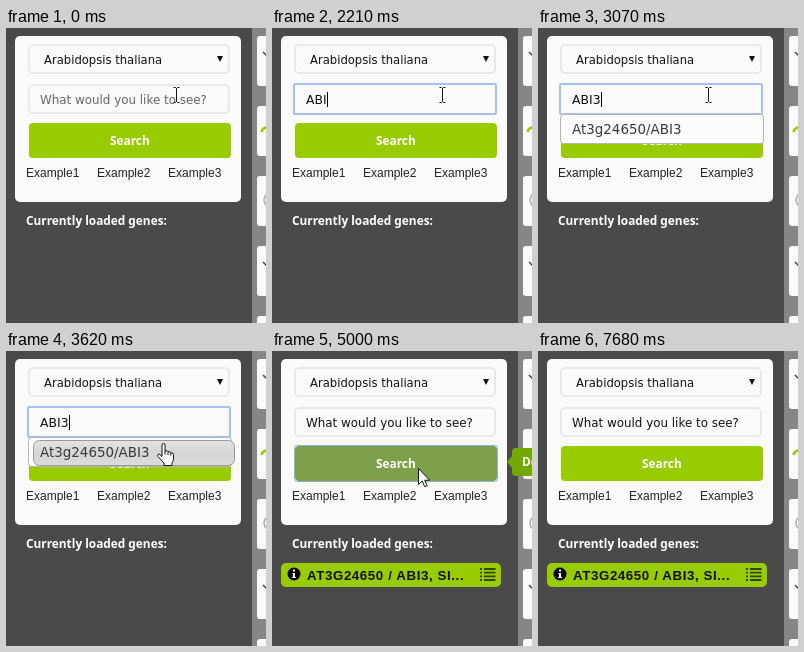
An HTML page for the animation above (7.78 s loop, 260 px wide and 295 px high).

```html
<!DOCTYPE html>
<html lang="en">
<head>
<meta charset="utf-8">
<title>Gene search</title>
<style>
html, body { margin: 0; width: 100%; height: 100%; overflow: hidden; background: #4a4a4a; }
svg { display: block; width: 260px; height: 295px; }
text { white-space: pre; font-family: "DejaVu Sans", sans-serif; fill: #111; }
.bold { font: bold 11.85px "Noto Sans", sans-serif; fill: #fff; }
.link { font: 12px "Liberation Sans", sans-serif; fill: #222; }
.item { font-size: 13.45px; fill: #3a3a3a; }
.gene { font: bold 13.3px "Liberation Sans", sans-serif; letter-spacing: .6px; }
</style>
</head>
<body>
<svg viewBox="0 0 260 295">
  <defs>
    <linearGradient id="shade" x2="0" y2="1">
      <stop stop-color="#e4e4e4"/><stop offset=".5" stop-color="#d4d4d4"/><stop offset="1" stop-color="#dcdcdc"/>
    </linearGradient>
  </defs>
  <rect width="260" height="295" fill="#4a4a4a"/>
  <rect x="246" width="14" height="295" fill="#868686"/>
  <g id="cards" fill="#fafafa"></g>
  <g fill="none" stroke="#444" stroke-width="1.5">
    <path d="M257 24l4 4M257 234l4 4"/>
    <path d="M255.500 104q1-4 5-4.500" stroke="#9c0" stroke-width="2.500"/>
    <circle cx="265" cy="172" r="7" stroke="#aaa"/>
  </g>

  <rect x="9" y="8" width="226" height="166" rx="5" fill="#fafafa"/>
  <rect x="23" y="17" width="200" height="28" rx="4" fill="#fafafa" stroke="#e9e9e9" stroke-width="2"/>
  <text x="38" y="36" font-size="11.6">Arabidopsis thaliana</text>
  <path d="M211 28h6l-3 6z" fill="#111"/>

  <rect id="field" x="23" y="57" width="200" height="28" rx="4" fill="#fafafa" stroke="#e9e9e9" stroke-width="2"/>
  <rect id="focus" x="22" y="56" width="202" height="30" rx="1" fill="#fafafa" stroke="#a3c1f3" stroke-width="2"/>
  <text id="entry" x="34" y="76"></text>
  <rect id="caret" y="64" width="1" height="15"/>

  <rect id="button" x="23" y="95" width="202" height="35" rx="4"/>
  <rect id="ring" x="22.500" y="94.500" width="203" height="36" rx="2" fill="none" stroke="#8fb3d8"/>
  <text class="bold" x="104" y="117">Search</text>
  <text class="link" x="20" y="149">Example1</text>
  <text class="link" x="91" y="149">Example2</text>
  <text class="link" x="162" y="149">Example3</text>
  <text class="bold" x="20" y="196.500">Currently loaded genes:</text>

  <g id="gene">
    <rect x="9" y="212" width="220" height="24" rx="5" fill="#9c0"/>
    <circle cx="22" cy="223" r="6.500"/>
    <path d="M21 218.500h2v2h-2zM20.500 222h2.500v4h1v1h-4v-1h1v-3h-.5z" fill="#fff"/>
    <text class="gene" x="35" y="229">AT3G24650 / ABI3, SI...</text>
    <path id="list" stroke="#344400" stroke-width="1.800"/>
  </g>

  <g id="menu">
    <rect id="sheet" x="22.500" y="86.500" width="203" rx="3" fill="#fcfcfc" stroke="#b5b5b5"/>
    <rect id="glow" x="27.500" y="89.500" width="201" height="25" rx="6" fill="url(#shade)" stroke="#999"/>
    <g id="items"></g>
  </g>

  <g id="tip">
    <path d="M260 97h-16q-4 0-4 4v4l-5 6 5 6v4q0 4 4 4h16z" fill="#72a800"/>
    <text class="bold" x="250" y="115">De</text>
  </g>
  <path id="pointer" stroke-linejoin="round"/>
</svg>
<script>
const LOOP = 7780;
const $ = id => document.getElementById(id);
const set = (id, attrs) => { for (const k in attrs) $(id).setAttribute(k, attrs[k]); };
const show = (id, on) => $(id).style.display = on ? "" : "none";
// Latest value of a [time, value] list
const at = (steps, t) => steps.filter(s => s[0] <= t).pop().slice(1);

const HINT = "What would you like to see?";
const typed = [[0, HINT], [710, ""], [1760, "A"], [2060, "AB"], [2210, "ABI"],
  [2640, "ABI3"], [3900, "At3g24650/ABI3, "], [5000, HINT]];
const fade = [[0, 0], [4020, .5], [4140, 1], [6310, .8], [6460, .5], [6580, .25], [6700, 0]];
const moves = [[0, "beam", 167, 59], [3350, "beam", 164, 75], [3500, "hand", 157, 91],
  [3620, "hand", 151, 92], [3900, "arrow", 152, 96], [4140, "arrow", 152, 104],
  [4290, "arrow", 146, 117], [6310, "hand", 136, 146], [6460, "arrow", 127, 176],
  [6580, "arrow", 129, 203], [6700, "hand", 136, 228], [6850, "arrow", 180, 260],
  [6970, "arrow", 217, 285], [7120, "none", 0, 0]];
const shapes = {
  beam: "M.5 .5h2l1 1 1-1h2M3.500 1.500v13M.5 15.500h2l1-1 1 1h2",
  arrow: "M.5 .5v16l3.700-3.500 2.500 5.700 2.500-1-2.500-5.500h5z",
  hand: "M5 13V2q0-1.500 1.500-1.500T8 2v6q2.500-1 3 .8 2.300-.8 2.800 1 2.700-.5 2.700 2v4q0 2-1.500 4v2.700H7V20L1 13.500q-1-2 .8-2.500 1.700 0 3.200 3M8 8v3.500M11 9v3M13.800 10v2.500",
  none: ""
};
const genes = ["At2g36270/ABI5", "At2g40220/ABI4", "At2g40220/ATABI4", "At2g44900/ARABIDILLO-1",
  "At2g44900/ARABIDILLO1", "At2g46225/ABIL1", "At3g08550/ABI8"];
const rows = list => list.map((g, i) => `<text class="item" x="34" y="${106 + 29 * i}">${g}</text>`).join("");

for (let y = 8; y < 295; y += 70)
  $("cards").innerHTML += `<rect x="251" y="${y}" width="16" height="50" rx="3"/>`;
set("list", { d: [218, 221.7, 225.4, 229].map(y => `M208 ${y}h2m2 0h11.500`).join("") });

function render(t) {
  const within = (a, b) => t >= a && t < b;
  const [text] = at(typed, t);
  show("focus", within(710, 4720));
  $("entry").textContent = text;
  $("entry").style.fontSize = text === HINT ? "11.9px" : "12.4px";
  $("entry").style.fill = t < 710 ? "#666" : "#111";
  set("caret", { x: Math.round(34 + (text ? $("entry").getComputedTextLength() : 0)) });
  show("caret", within(710, 1110) || within(1640, 4290));

  set("button", { fill: within(4020, 6310) ? "#7fa04b" : "#9c0" });
  show("ring", within(4720, 7680));
  show("gene", t >= 5000);
  $("tip").style.opacity = at(fade, t)[0];

  const full = t < 3070;
  show("menu", within(2640, 3900));
  show("glow", t >= 3500);
  set("sheet", { height: full ? 220 : 29 });
  $("items").innerHTML = rows(full ? genes : ["At3g24650/ABI3"]);

  const [kind, x, y] = at(moves, t);
  set("pointer", { d: shapes[kind], transform: `translate(${x} ${y})`,
    fill: kind === "beam" ? "none" : "#fff", stroke: "#111" });
}

const start = performance.now();
function tick() {
  render((performance.now() - start) % LOOP);
  requestAnimationFrame(tick);
}
tick();
</script>
</body>
</html>
```
